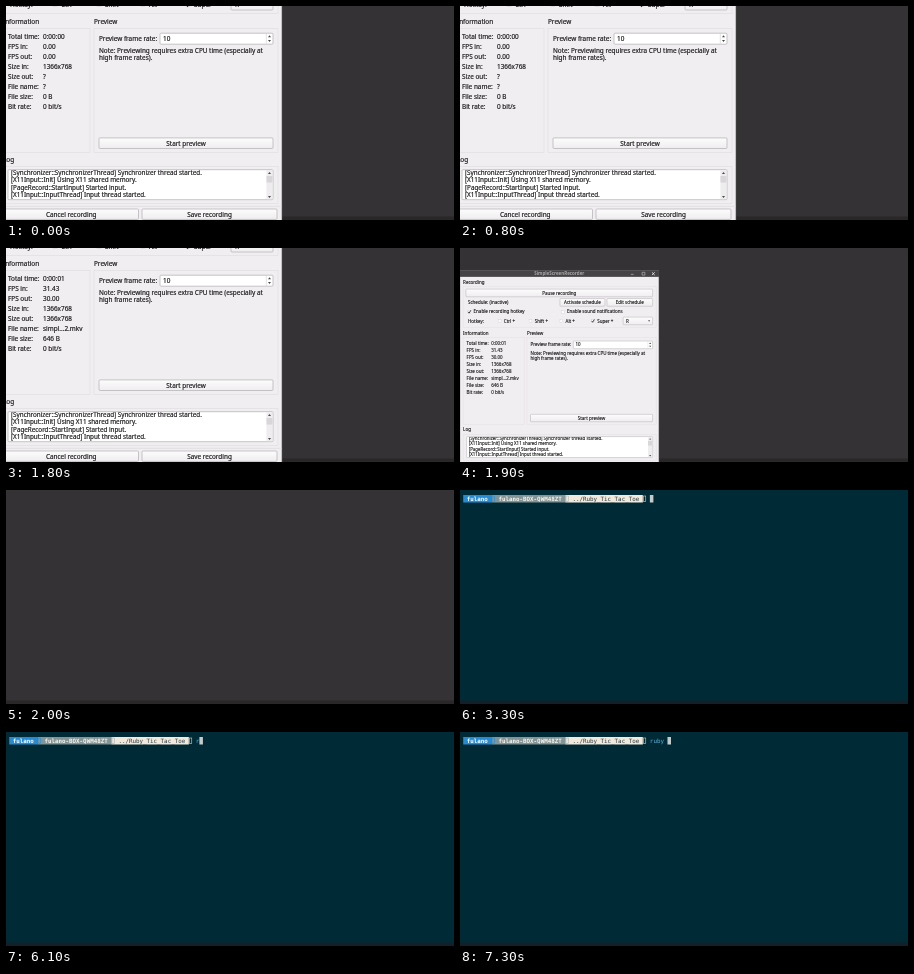
An HTML page for the animation above (8000 ms loop, 448 px wide and 214 px high).

```html
<!DOCTYPE html>
<html lang="en">
<head>
<meta charset="utf-8">
<title>Screen recording</title>
<style>
  html, body { margin: 0; width: 100%; height: 100%; overflow: hidden; background: #343234; }
  svg { display: block; width: 448px; height: 214px; }
  text { white-space: pre; }
  .ui { font: 6.4px "Noto Sans", sans-serif; fill: #1d1b1d; }
  .ui text { stroke: #1d1b1d; stroke-width: 0.18px; }
  .ui .title { fill: #aaa7a9; stroke: none; font-weight: bold; }
  .mono { font: 5.85px "DejaVu Sans Mono", monospace; }
  .bold { font-weight: bold; }
</style>
</head>
<body>
<svg id="stage" viewBox="0 0 448 214" xmlns="http://www.w3.org/2000/svg">
  <defs>
    <linearGradient id="face" x2="0" y2="1">
      <stop stop-color="#fdfcfd"/><stop offset="1" stop-color="#efedef"/>
    </linearGradient>
    <clipPath id="logClip"><rect x="2.5" y="164.2" width="264" height="29.5"/></clipPath>
  </defs>
  <rect width="448" height="214" fill="#343234"/>
  <rect y="210.5" width="448" height="3.5" fill="#2a2729"/>
  <g id="recorder" class="ui"></g>
  <g id="terminal" class="mono"></g>
</svg>
<script>
const LOOP = 8000;
const byId = id => document.getElementById(id);

function add(parent, tag, attrs, content) {
  const node = document.createElementNS("http://www.w3.org/2000/svg", tag);
  for (const key in attrs) node.setAttribute(key, attrs[key]);
  if (content !== undefined) node.textContent = content;
  parent.append(node);
  return node;
}

const recorder = byId("recorder");
const terminal = byId("terminal");

const box = (x, y, width, height, fill, extra = {}) =>
  add(recorder, "rect", { x, y, width, height, fill, ...extra });
const path = (d, stroke, width = 0.7) =>
  add(recorder, "path", { d, stroke, "stroke-width": width, fill: "none" });
// y is the middle of the line of text
const label = (x, y, content, extra = {}) =>
  add(recorder, "text", { x, y: y + 2.3, ...extra }, content);
const field = (x, y, w, h, fill = "#fff") =>
  box(x, y, w, h, fill, { rx: 1, stroke: "#b9b6b9", "stroke-width": 0.8 });
// Small filled triangle; dir is -1 for up and 1 for down
const arrow = (x, y, dir) =>
  add(recorder, "path", { d: `M${x - 1.5} ${y - dir}h3l-1.5 ${2 * dir}z`, fill: "#4a484a" });

function button(x, y, w, h, content) {
  field(x, y, w, h, "url(#face)");
  label(x + w / 2, y + h / 2, content, { "text-anchor": "middle" });
}

function group(x, y, w, h, title) {
  label(x, y, title);
  box(x, y + 6.5, w, h, "none", { stroke: "#e1dee1", "stroke-width": 0.7 });
}

function checkbox(x, y, content, checked) {
  box(x - 2, y - 2, 4, 4, "#fff", { stroke: "#cfcccf", "stroke-width": 0.6 });
  if (checked) path(`M${x - 1.8} ${y}l1.4 1.8 2.4-4`, "#222", 1.2);
  label(x + 6, y, content);
}

function buildRecorder() {
  box(-7.5, -74, 283.5, 320, "#f1eef1", { stroke: "#565456", "stroke-width": 0.6 });
  box(-7.5, -74, 283.5, 9.5, "#454345");
  label(134, -69.5, "SimpleScreenRecorder", { "text-anchor": "middle", class: "title" });
  path("M236 -68h4M252 -71h4v4h-4z", "#b5b2b5", 1);
  path("M266 -71l4 4m0-4l-4 4", "#eceaec", 1.2);

  group(-3, -57, 275, 58, "Recording");
  button(1, -47, 266, 11, "Pause recording");
  label(4, -28, "Schedule: (inactive)");
  button(135, -33.5, 64, 11, "Activate schedule");
  button(202, -33.5, 65, 11, "Edit schedule");
  checkbox(6, -14.5, "Enable recording hotkey", true);
  checkbox(139, -14.5, "Enable sound notifications");
  label(4, -1.5, "Hotkey:");
  checkbox(49, -1.5, "Ctrl +");
  checkbox(93, -1.5, "Shift +");
  checkbox(137, -1.5, "Alt +");
  checkbox(182, -1.5, "Super +", true);
  field(225, -7, 42, 11, "url(#face)");
  label(229, -1.5, "R");
  arrow(262, -1.5, 1);

  group(-3, 16, 87, 124, "Information");
  group(88, 16, 184, 124, "Preview");
  label(93, 32.5, "Preview frame rate:");
  field(154, 27.2, 113, 11);
  label(157, 32.7, "10");
  path("M260.3 27.5v10.4", "#d8d5d8");
  arrow(263.5, 30.3, -1);
  arrow(263.5, 34.9, 1);
  label(93, 44.2, "Note: Previewing requires extra CPU time (especially at");
  label(93, 51.7, "high frame rates).");
  button(93, 131.9, 174, 10.6, "Start preview");

  group(-3, 154, 275, 37, "Log");
  field(2, 163.7, 265, 30);
  const log = add(recorder, "g", { "clip-path": "url(#logClip)", "font-size": 6.3 });
  ["[Synchronizer::SynchronizerThread] Synchronizer thread started.",
   "[X11Input::Init] Using X11 shared memory.",
   "[PageRecord::StartInput] Started input.",
   "[X11Input::InputThread] Input thread started."
  ].forEach((line, i) => add(log, "text", { x: 5, y: 168.9 + i * 7.4 }, line));
  box(260.5, 164.2, 6, 29, "#eeecee");
  box(260.5, 170, 6, 6.5, "#d9d6d9");
  arrow(263.5, 167, -1);
  arrow(263.5, 191, 1);

  path("M-7.5 200.3H276", "#dddadd");
  button(-2, 203, 134.5, 10.4, "Cancel recording");
  button(136, 203, 135, 10.4, "Save recording");
}

const STATS = [
  ["Total time:", "0:00:00", "0:00:01"],
  ["FPS in:", "0.00", "31.43"],
  ["FPS out:", "0.00", "30.00"],
  ["Size in:", "1366x768", "1366x768"],
  ["Size out:", "?", "1366x768"],
  ["File name:", "?", "simpl...2.mkv"],
  ["File size:", "0 B", "646 B"],
  ["Bit rate:", "0 bit/s", "0 bit/s"]
];

buildRecorder();
const statValues = STATS.map(([name], i) => {
  const y = 30.4 + i * 10.1;
  label(2, y, name);
  return label(37, y, "");
});

const CELL = 3.522, ROW = 5, ROW_HEIGHT = 7.5;
const column = n => 3.2 + n * CELL;
const cells = (from, count, fill) =>
  add(terminal, "rect", { x: column(from), y: ROW, width: count * CELL, height: ROW_HEIGHT, fill });
const write = (at, content, fill, cls = "") =>
  add(terminal, "text", { x: column(at), y: 10.8, fill, class: cls }, content);
const missingGlyph = (at, stroke) => add(terminal, "rect", {
  x: column(at) + 0.6, y: ROW + 1, width: CELL - 1.2, height: 5.4, fill: "none", stroke, "stroke-width": 0.6
});

add(terminal, "rect", { width: 448, height: 211, fill: "#002b36" });
add(terminal, "rect", { y: 210.5, width: 448, height: 3.5, fill: "#13202a" });
cells(0, 8, "#268bd2");
cells(8, 21, "#839496");
cells(29, 22, "#f1e9dc");
write(1, "fulano", "#fff", "bold");
missingGlyph(8, "#268bd2");
write(10, "fulano-BOX-QWM48ZT", "#f7f4ec", "bold");
missingGlyph(29, "#a5b0b0");
write(31, "../Ruby_Tic_Tac_Toe", "#2c3a40");
missingGlyph(51, "#d8d2c6");

const PROMPT_END = 53;
const typed = write(PROMPT_END, "", "#5db4e0");
const cursor = cells(PROMPT_END, 1, "#c3cccb");
const KEY_TIMES = [6100, 6200, 6300, 6500, 7000];

const show = (node, visible) => node.setAttribute("display", visible ? "inline" : "none");

function draw(t) {
  const minimizing = t >= 1900;
  show(recorder, t < 2000);
  recorder.setAttribute("transform", minimizing ? "translate(5.2 74) scale(.702 .7)" : "");
  statValues.forEach((node, i) => { node.textContent = STATS[i][t < 1000 ? 1 : 2]; });

  show(terminal, t >= 3300);
  const count = KEY_TIMES.filter(time => t >= time).length;
  typed.textContent = "ruby ".slice(0, count);
  cursor.setAttribute("x", column(PROMPT_END + count));
}

const start = performance.now();
function tick() {
  draw((performance.now() - start) % LOOP);
  requestAnimationFrame(tick);
}
tick();
</script>
</body>
</html>
```
